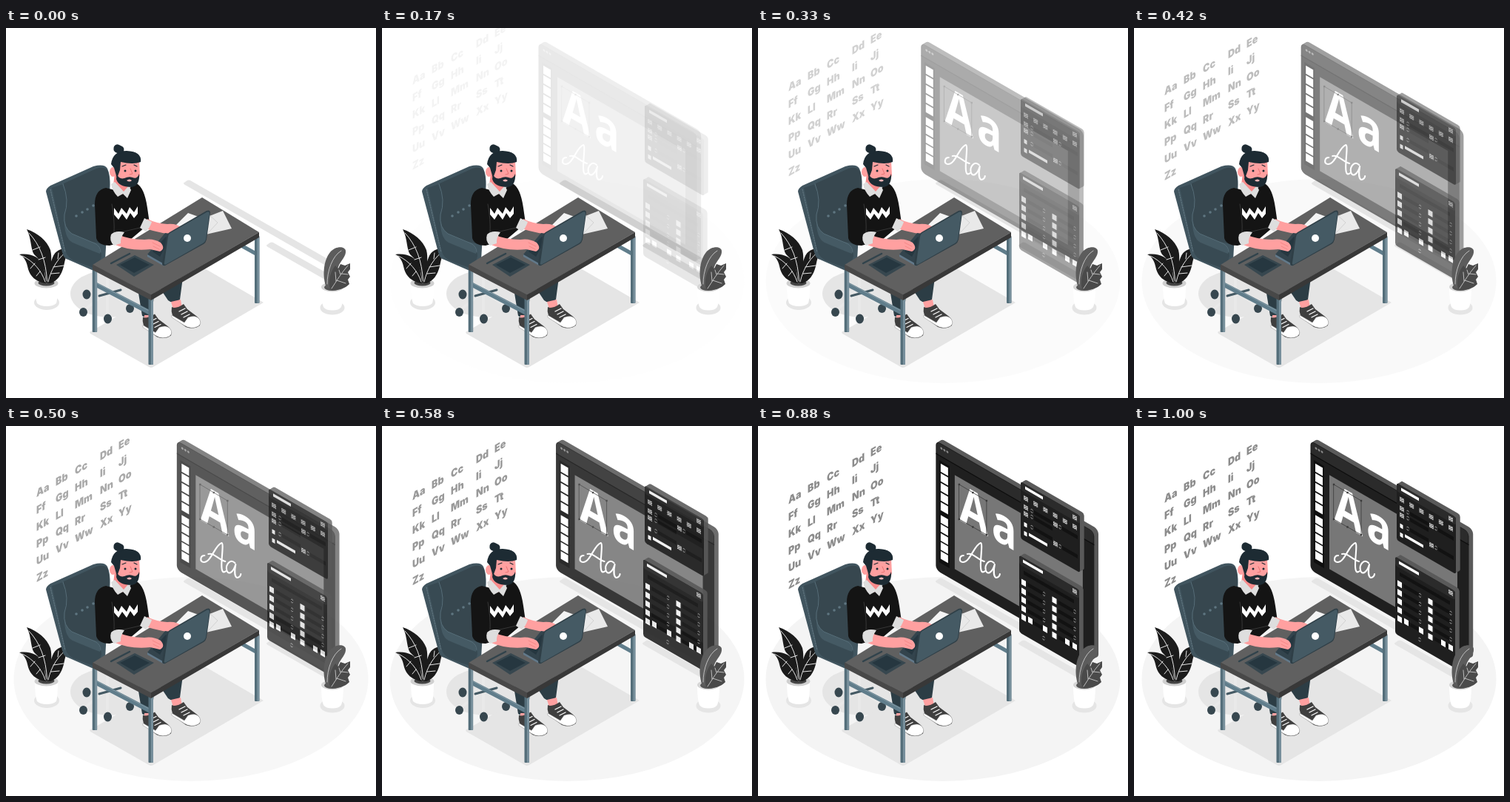
Write an HTML page that moves like this. It is 500 by 500 pixels and loops after 1.04 s.

```html
<!DOCTYPE html>
<html lang="en">
<head>
<meta charset="utf-8">
<title>Designer at work</title>
<style>
  html, body { margin: 0; width: 100%; height: 100%; overflow: hidden; background: #fff; }
  svg { display: block; width: 100vw; height: 100vh; }
  .letters { font: 900 14.5px Inter, sans-serif; fill: #8c8c8c; }
  .sample { font: 700 70px "Open Sans", sans-serif; fill: #fff; }
  .line { fill: none; stroke-linecap: round; stroke-linejoin: round; }
</style>
</head>
<body>
<svg viewBox="0 0 500 500">
  <defs>
    <pattern id="checker" width="3" height="3" patternUnits="userSpaceOnUse">
      <rect width="3" height="3" fill="#555"/>
      <path d="M0 0h1.5v3h1.5v-1.5h-3z" fill="#e8e8e8"/>
    </pattern>
  </defs>

  <ellipse id="floor" cx="250" cy="342" rx="239.500" ry="138" fill="#f4f4f4"/>

  <g id="shadows" fill="#e5e5e5">
    <path d="M240 209.500l5-3.500q2-1 4 0l189 108-6 7-190-109q-2-1-2-2.500z"/>
    <path d="M352 293.500l5-3.500q2-1 4 0l74 42-4 8-77-44q-2-1-2-2.500z"/>
    <ellipse cx="140" cy="359" rx="53" ry="32"/>
    <path d="M113 411L265 323 348 371 199 458q-3 2-6 0l-79-45z"/>
    <ellipse cx="55" cy="371" rx="17" ry="10"/>
    <ellipse cx="441" cy="378" rx="16.500" ry="9.500"/>
  </g>

  <g id="letters" class="letters"></g>

  <g id="screen">
    <g id="screenBody"></g>
    <g class="sample">
      <text transform="matrix(.8 .46 0 1 270.500 127)">A</text>
      <text transform="matrix(.8 .46 0 1 314 151)">a</text>
    </g>
    <path class="line" stroke="#3a3a3a" stroke-width=".8" d="M270 79L307 101V147L270 126z"/>
    <g id="handles" fill="#3a3a3a"></g>
    <path class="line" stroke="#fff" stroke-width="2.100" d="M276 175C270 175 269 184 275 184C285 184 290 161 299 158C302 158 299 176 299 188C299 197 301 199 305 196M281 173C289 171 294 180 304 183M317 185C311 179 304 187 306 195C308 202 315 198 318 187C316 197 317 204 320 205C323 205 325 202 325 200"/>
  </g>
  <g id="upper"></g>
  <g id="lower"></g>

  <g id="rightPlant">
    <path d="M426 350q0 20 3 27 3 4.500 12 4.500t12-4.500q3-7 3-27z" fill="#fff"/>
    <ellipse cx="441" cy="350" rx="15" ry="6.500" fill="#d6d6d6"/>
    <ellipse cx="441" cy="350.500" rx="11" ry="4.500" fill="#555"/>
    <path d="M433 351C427 335 429 314 438 303C446 294 458 295 459 301C460 309 452 314 449 323C445 334 445 344 439 352z" fill="#5c5c5c"/>
    <path d="M438 353C435 342 438 330 445 321L449 325 452 319 458 321 465 318 465 326 462 330 465 336 462 340 464 346C456 354 446 355 438 353z" fill="#4a4a4a"/>
    <path class="line" stroke="#d8d8d8" stroke-width=".8" d="M434 346C434 328 441 308 453 301M440 352C446 343 453 331 462 321M446 342l-1-12M447 341l12 4M452 333l-2-6M453 332l9 1"/>
  </g>

  <g id="leftPlant">
    <path d="M39 345q0 20 3 27 4 4 13 4t13-4q2-7 2-27z" fill="#fff"/>
    <ellipse cx="54.500" cy="345" rx="16" ry="6.500" fill="#d0d0d0"/>
    <ellipse cx="54.500" cy="344.500" rx="11" ry="4" fill="#444"/>
    <g fill="#1b1b1b">
      <path d="M54 344C54 330 49 316 39 307C33 301 35 285 28 272C43 277 55 287 60 300C63 311 60 328 58 344z"/>
      <path d="M52 345C40 342 33 336 30 326C28 316 25 309 18 306C33 304 45 309 50 321C53 330 53 338 54 345z"/>
      <path d="M56 345C57 330 59 320 63 310C67 299 78 296 90 298C81 304 80 313 78 322C75 334 69 342 60 345z"/>
    </g>
    <path class="line" stroke="#e6e6e6" stroke-width="1" d="M31 277C46 293 54 314 55.500 342M22 308C37 315 48 328 53 343M86 299C71 309 61 325 57 343M36 300l10-4M44 313l9-3M33 325l6-7M41 335l5-6M70 312l1-8M64 323l14-2M61 332l11-1"/>
  </g>

  <g id="chair">
    <path class="line" stroke="#e9e9e9" stroke-width="4" d="M137 330V358M137 356L111 358M137 356L106 381M137 356V388M137 356L166 375"/>
    <path class="line" stroke="#455a64" stroke-width="3" d="M126 362L155 354"/>
    <g fill="#37474f">
      <ellipse cx="109" cy="360" rx="5.500" ry="6.500"/><ellipse cx="104.500" cy="384" rx="5.500" ry="6"/>
      <ellipse cx="137.500" cy="393" rx="5.500" ry="6.500"/><ellipse cx="167.500" cy="379" rx="5.500" ry="6"/>
    </g>
    <path d="M54 221Q54 217 60 213L118 187Q133 183 137 190Q143 204 139 230L133 330 116 327 84 313Q78 312 76 303z" fill="#41555f"/>
    <path d="M78 210L122 190Q134 186 138 194Q142 206 137 230L131 292 92 284Q82 276 79 262z" fill="#37474f"/>
    <path d="M77 211Q85 233 79 250Q76 268 87 277L119 291Q129 295 129 308L124 326 96 316Q83 312 80 300L62 216z" fill="#384a53"/>
    <path d="M79 256Q78 270 89 278L120 291Q129 296 127 305L119 302 90 290Q78 284 79 256z" fill="#455a64"/>
    <path class="line" stroke="#566d78" stroke-width="1" d="M77 211Q86 233 79 252Q77 270 89 278L120 291Q128 295 128 303"/>
    <path class="line" stroke="#6d828c" stroke-width=".8" stroke-dasharray="2 1.500" d="M60 218L80 303"/>
    <g fill="#5f7681">
      <circle cx="95" cy="254" r="1.800"/><circle cx="103" cy="249" r="1.800"/><circle cx="110" cy="245" r="1.800"/><circle cx="118" cy="240" r="1.800"/>
    </g>
  </g>

  <g id="legs">
    <path d="M178 352L201 352 197 389Q191 393 184 389zM207 350L239 337 235 367Q226 374 219 368z" fill="#2c3d45"/>
    <path d="M187 388h9v10h-9zM223 370l13-3 2 11-12 2z" fill="#ffa0a0"/>
    <g id="shoe">
      <path d="M224 377Q230 380 240 373L245 380 257 389Q264 394 262 402Q254 408 243 404L231 395Q222 389 224 377z" fill="#3f3f3f"/>
      <path d="M246 391Q256 387 261 393Q265 399 260 403Q250 408 241 402L224 391V388L241 398z" fill="#fff" stroke="#777" stroke-width=".4"/>
      <path class="line" stroke="#fff" stroke-width="1.300" d="M234 383l8-4M237 387l8-4M240 391l8-4"/>
    </g>
    <use href="#shoe" x="-39" y="13.500"/>
  </g>

  <g id="man">
    <path d="M135 216Q120 219 120 238L122 284Q125 294 140 294L168 286 194 264 191 243Q187 215 176 210L158 222z" fill="#141414"/>
    <path class="line" stroke="#3b3b3b" stroke-width=".9" d="M143 238Q147 259 146 277M146 278L181 270"/>
    <path d="M146 243l6 8 4-8 7 8 4-9 6 7 5-8v10l-5 6-5-7-5 9-6-8-5 8-6-7z" fill="#fff"/>
    <path d="M147 196L165 210 165 222 155 225 145 213z" fill="#f78b8b"/>
    <path d="M142 211L147 208 159 221 166 213 169 219 164 230 158 224 151 228Q144 221 142 211z" fill="#dedede"/>
    <path d="M149 179Q163 171 180 180L181 199Q178 211 166 212Q153 212 150 201z" fill="#ffa0a0"/>
    <ellipse cx="144.500" cy="194.500" rx="4.500" ry="6.500" fill="#ffa0a0"/>
    <path d="M150 198Q153 205 160 203Q166 200 171 202Q177 205 180 197Q181 213 170 215Q152 215 149 204z" fill="#1d2b33"/>
    <path d="M163 206q4-3 7 0-3 3-7 0z" fill="#ffb7b7"/>
    <path d="M142 184Q144 166 163 166Q184 167 182 181Q172 185 155 181L154 192 150 203 146 189z" fill="#1d2b33"/>
    <path d="M146 160Q149 155 155 159Q161 161 159 167Q155 172 148 168Q144 165 146 160z" fill="#1d2b33"/>
    <path class="line" stroke="#1d2b33" stroke-width="1.200" d="M157 187l5-2M173 185l4 2"/>
    <g fill="#1d2b33"><circle cx="161" cy="193" r="1.500"/><circle cx="175" cy="193" r="1.500"/></g>
    <path class="line" stroke="#e87575" stroke-width="1" d="M168 190l3 7-4 1"/>
  </g>

  <g id="desk">
    <path d="M318 291l18 10v6l-18-10z" fill="#607d8b"/>
    <path d="M121 343l75 39v7l-75-39z" fill="#607d8b"/>
    <path class="line" stroke="#8399a4" stroke-width="1" d="M121 344l74 39"/>
    <g id="posts"></g>
    <path d="M117 320L265 229 342 276 196 361z" fill="#606060"/>
    <path d="M117 319.500L196 360.500V368L117 327z" fill="#484848"/>
    <path d="M196 360.500L342 276V283L196 368z" fill="#383838"/>
    <path d="M149 320L174 307 200 320 173 336z" fill="#37474f"/>
    <path d="M154 320L174 310 194 320 173 331z" fill="#263740"/>
    <path class="line" stroke="#31434c" stroke-width="2.500" d="M142 318L167 305"/>
    <path d="M229 267L246 250 274 260 255 278z" fill="#f4f4f4"/>
    <path d="M270 256L293 247 305 271 270 279z" fill="#e9e9e9"/>
    <path class="line" stroke="#d2d2d2" stroke-width="1" d="M273 251L286 263 273 277"/>
  </g>

  <g id="arms">
    <path d="M191 258Q203 264 218 265Q231 264 237 270L233 280Q211 278 188 271z" fill="#ffa0a0"/>
    <path d="M187 257L197 262Q194 271 189 275L181 270z" fill="#dedede"/>
    <path d="M191 306L215 277 231 279 214 321z" fill="#33444d"/>
    <path d="M198 302L216 282 220 287 208 309z" fill="#263740"/>
    <path d="M149 278Q166 286 187 286Q199 284 209 290Q216 298 208 302L195 299Q168 302 145 292z" fill="#ffa0a0"/>
    <path d="M142 279Q148 273 160 276Q154 284 155 291L146 294Q139 288 142 279z" fill="#dedede"/>
    <path class="line" stroke="#f08080" stroke-width=".8" d="M198 290l10 5M199 295l8 4"/>
  </g>

  <g id="laptop">
    <path d="M191 306L212 318 214 322 191 309z" fill="#62798a"/>
    <path d="M217 281Q218 278 221 276L271 247Q276 245 276 250L271 286Q270 290 267 292L215 321Q211 322 211 318z" fill="#2f3f47"/>
    <path d="M219 282Q219 279 222 277L271 249Q275 247 275 251L270 286Q269 289 266 291L217 319Q213 321 214 317z" fill="#455a64"/>
    <circle cx="245" cy="284" r="5" fill="#fff"/>
  </g>
</svg>

<script>
const byId = id => document.getElementById(id);
const rect = (x, y, w, h, fill, rx = 0) =>
  `<rect x="${x}" y="${y}" width="${w}" height="${h}" rx="${rx}" fill="${fill}"/>`;
const SLOPE = 0.577;

// Upright slab facing lower left; content uses coordinates on its front face.
function slab(x, y, w, h, radius, content) {
  let edges = "";
  for (let i = 6; i > 0; i--) {
    const dx = i * 0.95;
    edges += rect(dx, -dx * (0.58 + SLOPE), w, h, "#5a5a5a", radius);
  }
  return `<g transform="matrix(1 ${SLOPE} 0 1 ${x} ${y})">${edges}${rect(0, 0, w, h, "#1f1f1f", radius)}${content}</g>`;
}

const square = (x, y, size = 6) => rect(x - size / 2, y - size / 2, size, size + 1.5, "#fff");
const checker = (x, y) => rect(x - 3, y - 3, 6, 6, "url(#checker)");
const bar = (x, y, w) => rect(x, y - 2.5, w, 5, "#121212");
const stepper = (x, y) =>
  `<path class="line" stroke="#aaa" stroke-width=".7" d="M${x - 1.2} ${y - 1.4}l1.200-1.200 1.200 1.200M${x - 1.2} ${y + 1.4}l1.200 1.200 1.200-1.200"/>`;

function screenBody() {
  let parts = rect(1, 1, 212, 16, "#2b2b2b", 4) + rect(0, 17, 214, 1.2, "#0c0c0c");
  for (let i = 0; i < 3; i++) parts += `<circle cx="${7.5 + i * 4}" cy="6.5" r="1.500" fill="#8a8a8a"/>`;
  parts += rect(4.5, 24, 14, 138, "#0f0f0f");
  for (let i = 0; i < 5; i++) {
    parts += rect(6.5, 27.5 + i * 13, 10, 11, "#fff");
    parts += rect(6.5, 97 + i * 12.2, 10, 10.4, "#fff");
  }
  parts += rect(25.5, 32, 173, 127, "#777");
  return slab(238.5, 19.5, 214, 175, 6, parts);
}

function upperPalette() {
  let parts = rect(0, 0, 80, 11, "#2b2b2b", 3) + rect(6, 3, 24, 4, "#fff") + checker(73, 6.5);
  for (let i = 0; i < 6; i++) parts += checker(7 + i * 13.2, 19);
  for (const y of [31, 39, 53]) parts += bar(18, y, 25) + stepper(15, y);
  for (const y of [31, 57]) parts += bar(56, y, 21) + stepper(53, y) + checker(47, y);
  parts += checker(7, 31) + checker(7, 40) + square(6.5, 54, 4) + square(6.5, 66, 4) + rect(11, 63, 25, 4, "#fff");
  return slab(355, 77, 80, 77, 3, parts);
}

function lowerPalette() {
  let parts = rect(0, 0, 81, 12, "#2b2b2b", 3) + rect(5, 3, 27, 4, "#fff") + checker(75, 5.5) + bar(6, 20, 68);
  for (let i = 0; i < 5; i++) {
    const y = 33 + i * 11.8;
    for (const x of [6, 47.5]) parts += bar(x + 5, y, 22) + square(x, y) + stepper(x + 27.5, y);
  }
  for (const x of [15, 35, 65, 75]) parts += square(x, 79);
  return slab(353, 176.5, 81, 104, 3, parts + stepper(33, 93));
}

function letterGrid() {
  const columns = [41, 67, 93, 127, 152];
  let out = "";
  for (let i = 0; i < 26; i++) {
    const x = columns[i % 5];
    const y = 104 - (x - 41) * SLOPE + Math.floor(i / 5) * 23;
    const upper = String.fromCharCode(65 + i);
    out += `<text transform="matrix(.866 -.5 0 1 ${x} ${y})">${upper + upper.toLowerCase()}</text>`;
  }
  return out;
}

const post = (x, y, h) => rect(x, y, 6.4, h, "#546e7a", 1) + rect(x + 3.4, y, 3, h, "#78909c", 1);

byId("letters").innerHTML = letterGrid();
byId("screenBody").innerHTML = screenBody();
byId("upper").innerHTML = upperPalette();
byId("lower").innerHTML = lowerPalette();
byId("posts").innerHTML = post(116.7, 325, 86) + post(192.5, 365, 90) + post(336, 281, 91);
byId("handles").innerHTML = [[270, 79], [307, 101], [307, 147], [270, 126], [288.5, 90], [288.5, 136.5]]
  .map(([x, y]) => rect(x - 1.2, y - 1.2, 2.4, 2.4, "#3a3a3a")).join("");

// Cubic Bezier easing (.36, -.01, .5, 1.38): overshoots slightly, then settles.
function ease(p) {
  const curve = (s, a, b) => 3 * (1 - s) ** 2 * s * a + 3 * (1 - s) * s * s * b + s ** 3;
  let low = 0, high = 1;
  for (let i = 0; i < 24; i++) {
    const mid = (low + high) / 2;
    if (curve(mid, 0.36, 0.5) < p) low = mid; else high = mid;
  }
  return curve(high, -0.01, 1.38);
}

const LOOP = 1040, RATE = 24, TRAVEL = 30;
const entrances = [["floor", 0, 0], ["letters", 0, -1], ["screen", -1, 0], ["upper", 0, 1], ["lower", 0, 1]]
  .map(([id, dx, dy]) => ({ node: byId(id), dx, dy }));

function draw(time) {
  const step = Math.floor((time % LOOP + 5) * RATE / 1000);
  const amount = step < 2 ? 0 : ease(Math.min(1, step / RATE));
  const rest = TRAVEL * (1 - amount);
  for (const { node, dx, dy } of entrances) {
    node.setAttribute("opacity", Math.max(0, Math.min(1, amount)));
    node.setAttribute("transform", `translate(${dx * rest} ${dy * rest})`);
  }
}

const start = performance.now();
function tick() {
  draw(performance.now() - start);
  requestAnimationFrame(tick);
}
tick();
</script>
</body>
</html>
```
